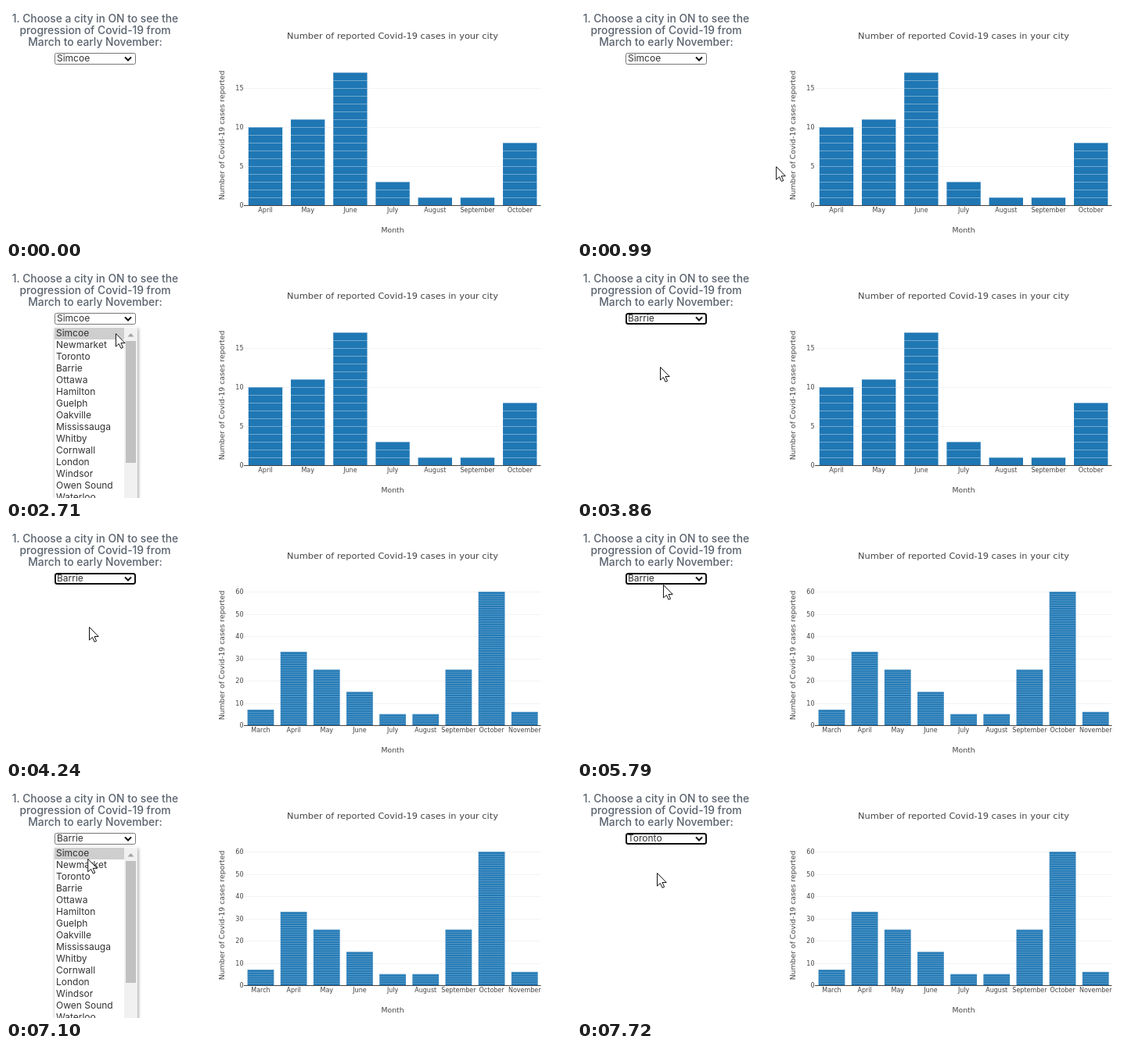
These frames come from a looping animation (722x297 px, 8000 ms). An HTML page:

```html
<!DOCTYPE html>
<html lang="en">
<head>
<meta charset="utf-8">
<title>Cases by city</title>
<style>
html, body { margin: 0; width: 100%; height: 100%; overflow: hidden; background: #fff; }
svg { display: block; width: 722px; height: 297px; }
.ui { font-family: Inter, Lato, sans-serif; font-size: 12px; fill: #333; }
.head { font-size: 13.8px; font-weight: 500; fill: #5a636e; text-anchor: middle; }
.chart { font-family: "DejaVu Sans", sans-serif; font-size: 8px; fill: #444; }
.mid { text-anchor: middle; }
.end { text-anchor: end; }
.title { font-size: 11.36px; }
.label { font-size: 9.3px; }
</style>
</head>
<body>
<svg id="stage" viewBox="0 0 722 297">
  <defs>
    <filter id="shadow" x="-20%" y="-10%" width="140%" height="120%">
      <feDropShadow dx="1" dy="2" stdDeviation="2.2" flood-color="#000" flood-opacity=".4"/>
    </filter>
  </defs>
  <g class="ui">
    <g class="head">
      <text x="114" y="21">1. Choose a city in ON to see the</text>
      <text x="114" y="36">progression of Covid-19 from</text>
      <text x="114" y="51">March to early November:</text>
    </g>
    <rect id="box" fill="#fff"/>
    <text id="value" x="65" y="71.3"></text>
    <path d="M152 65.5l4 4 4-4" fill="none" stroke="#111" stroke-width="2"/>
  </g>
  <g class="chart">
    <text class="mid title" x="494" y="42">Number of reported Covid-19 cases in your city</text>
    <text class="mid label" x="494" y="290">Month</text>
    <text class="mid label" transform="translate(279 165.5) rotate(-90)">Number of Covid-19 cases reported</text>
    <g id="before"></g>
    <g id="after"></g>
    <path d="M304 255.5H683.5" stroke="#444"/>
  </g>
  <g id="list" class="ui">
    <rect x="62" y="78" width="106" height="240" fill="#fff" filter="url(#shadow)"/>
    <rect id="mark" x="62" width="89" height="15" fill="#cecece"/>
    <rect x="151" y="79" width="17" height="218" fill="#f1f1f1"/>
    <rect x="153" y="96" width="13" height="156" fill="#c1c1c1"/>
    <path d="M155.500 90.500h8l-4-4.500z" fill="#a3a3a3"/>
    <g id="rows"></g>
  </g>
  <circle id="click" r="14.500" fill="#fff200" fill-opacity=".62"/>
  <path id="pointer" d="M0 0V16.500L3.900 13L6.600 18.800L9.100 17.700L6.500 12H11.700Z" fill="#fff" stroke="#111" stroke-linejoin="round"/>
</svg>
<script>
const LOOP = 8000, BASE = 255, LEFT = 304.4, WIDTH = 379.4;
const $ = id => document.getElementById(id);
const cities = ["Simcoe", "Newmarket", "Toronto", "Barrie", "Ottawa", "Hamilton", "Guelph", "Oakville",
  "Mississauga", "Whitby", "Cornwall", "London", "Windsor", "Owen Sound", "Waterloo"];
const months = ["March", "April", "May", "June", "July", "August", "September", "October", "November"];

function add(parent, tag, attrs, text) {
  const el = document.createElementNS("http://www.w3.org/2000/svg", tag);
  set(el, attrs);
  if (text !== undefined) el.textContent = text;
  parent.appendChild(el);
}

function set(el, attrs) {
  for (const k in attrs) el.setAttribute(k, attrs[k]);
}

function show(el, on) {
  el.style.display = on ? "" : "none";
}

// Bars are stacks of single cases, parted by thin pale lines
function chart(g, names, counts, unit, step, top) {
  for (let v = 0; v <= top; v += step) {
    const y = BASE - v * unit;
    if (v) add(g, "path", { d: `M304 ${Math.round(y) + .5}H683.5`, stroke: "#f3f3f3" });
    add(g, "text", { x: 303.5, y: y + 3, class: "end" }, v);
  }
  const pitch = WIDTH / names.length, w = pitch * .8;
  names.forEach((name, i) => {
    const mid = LEFT + pitch * (i + .5), x = mid - w / 2, h = counts[i] * unit;
    add(g, "rect", { x, y: BASE - h, width: w, height: h, fill: "#1f77b4" });
    let d = "";
    for (let n = 1; n <= counts[i]; n++) d += `M${x} ${BASE - n * unit + .5}h${w}`;
    add(g, "path", { d, stroke: "#fff", "stroke-opacity": .36, "stroke-width": unit > 5 ? 1 : .8 });
    add(g, "text", { x: mid, y: 264, class: "mid" }, name);
  });
}

chart($("before"), months.slice(1, 8), [10, 11, 17, 3, 1, 1, 8], 10, 5, 15);
chart($("after"), months, [7, 33, 25, 15, 5, 5, 25, 60, 6], 2.85, 10, 60);
cities.forEach((c, i) => add($("rows"), "text", { x: 64, y: 90.3 + 15 * i }, c));

// Pointer path: time, x, y
const path = [
  [580, 566, 288], [960, 262, 212], [1320, 177, 139], [1770, 153, 72],
  [2560, 153, 72], [2710, 140.500, 86.500], [3080, 106.500, 129.500],
  [5260, 106.500, 129.500], [5790, 110.500, 75.500], [5940, 108, 71.500], [6110, 107.500, 70.500],
  [6800, 107.500, 70.500], [7340, 102.500, 111.500], [LOOP, 102.500, 111.500]
];

function pointerAt(t) {
  const i = Math.max(1, path.findIndex(p => p[0] >= t));
  const a = path[i - 1], b = path[i];
  const k = Math.max(0, (t - a[0]) / (b[0] - a[0]));
  return [a[1] + (b[1] - a[1]) * k, a[2] + (b[2] - a[2]) * k];
}

const within = (t, spans) => spans.some(([a, b]) => t >= a && t < b);
const openSpans = [[2320, 3860], [6400, 7720]];
const clickSpans = [[2250, 2400], [3630, 3860], [6340, 6570], [7490, 7720]];

function draw(t) {
  const [x, y] = pointerAt(t);
  const open = within(t, openSpans);
  const chosen = t < 3860 ? 0 : t < 7720 ? 3 : 2;
  const focused = t >= 3860 && !open;
  const hover = t >= 1700 && t < 2630;

  set($("pointer"), { transform: `translate(${x} ${y})` });
  show($("pointer"), t >= 580);
  set($("click"), { cx: x - .5, cy: y - .5 });
  show($("click"), within(t, clickSpans));

  set($("box"), focused
    ? { x: 63, y: 61, width: 102, height: 13, rx: 2.5, stroke: "#101010", "stroke-width": 2 }
    : { x: 62.5, y: 60.5, width: 103, height: 14, rx: 2, stroke: hover ? "#222" : "#767676", "stroke-width": 1 });
  $("value").textContent = cities[chosen];

  show($("list"), open);
  set($("mark"), { y: 79 + 15 * (y >= 79 ? Math.floor((y - 79) / 15) : chosen) });

  show($("before"), t < 4240);
  show($("after"), t >= 4240);
}

const start = performance.now();
function tick() {
  draw((performance.now() - start) % LOOP);
  requestAnimationFrame(tick);
}
tick();
</script>
</body>
</html>
```
